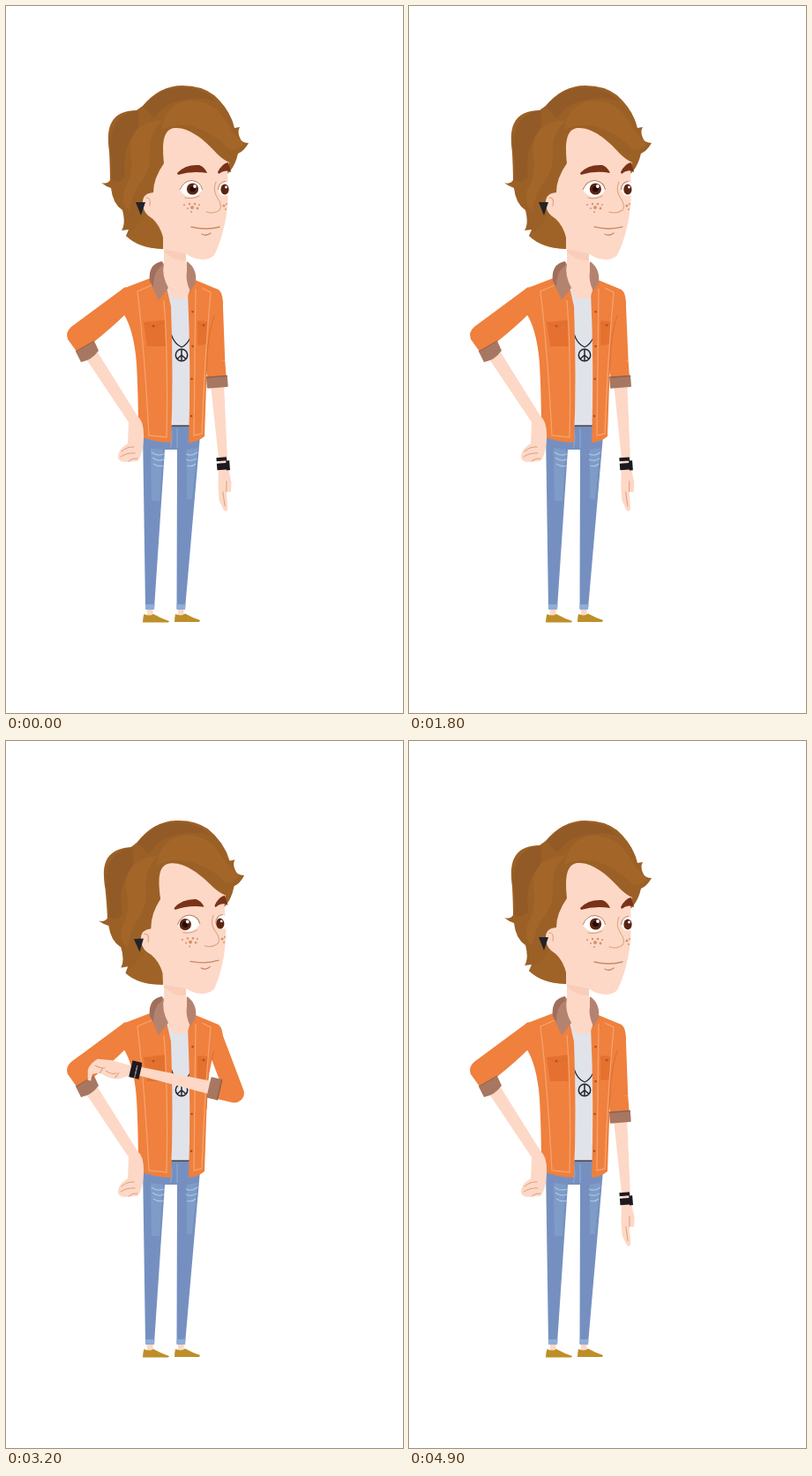
An HTML page for the animation above (5 s loop, 450x800 px).

```html
<!DOCTYPE html>
<html lang="en">
<head>
<meta charset="utf-8">
<style>
html, body { margin: 0; width: 100%; height: 100%; overflow: hidden; background: #fff; }
svg { display: block; width: 100%; height: 100%; }
.skin { fill: #fdd8c6; }
.orange { fill: #ef803d; }
.cuff { fill: #a87761; }
.jeans { fill: #7590c0; }
.stitch { fill: none; stroke: #f6a26a; stroke-width: 1.3; }
.crease { fill: none; stroke: #d99f7f; stroke-width: 1; stroke-linecap: round; }
.seam { fill: none; stroke: #d9692b; stroke-width: .8; }
.iris { fill: #5a2413; }
.shoe { fill: #bd8f28; }
</style>
</head>
<body>
<svg viewBox="0 0 450 800">
  <path id="sleeve" fill="none" stroke="#ef803d" stroke-width="21.5" stroke-linejoin="round"/>
  <circle class="orange" cx="235" cy="335" r="10.500"/>

  <g id="legs">
    <path class="skin" d="M160 680h6l1 10h-7zM195 680h6l1 10h-7z"/>
    <path class="shoe" d="M156.500 688Q163 691 167 688Q176 693 185 696L184 697.500H155Q155 692 156.500 688ZM192 688Q199 691 203 687.500Q211 692 220 695L219 697H191Q191 692 192 688Z"/>
    <path class="jeans" d="M155 478L188 474H208L220 486L203 682H193.500L194 502H180L168 682H158Z"/>
    <path fill="#7f9cc8" d="M164 500L178 502L174 560H165ZM205 502L217 500L211 558H205Z"/>
    <path fill="#8eacd8" d="M158 677H168.500L168 683H158ZM193.500 677H203.500L203 683H193.500Z"/>
    <path fill="none" stroke="#a9c5e4" stroke-width="1.3" d="M165 505Q171 510 179 507M166 511Q172 516 179 513M167 518Q173 522 179 520M204 507Q211 510 217 505M204 513Q210 516 216 512M205 520Q211 522 215 518"/>
    <path fill="none" stroke="#8fabd5" d="M186 476Q190 490 186 500M194 478V500"/>
  </g>

  <g id="torso">
    <path fill="#e1e3ea" d="M183 322H212V475H188Z"/>
    <path d="M188 475H208" stroke="#3b3030" stroke-width="1.3"/>
    <g fill="none" stroke="#25252e" stroke-width="1.5">
      <path d="M187 371Q191 383 199 386Q206 383 210 373" stroke-width="1.2"/>
      <circle cx="199" cy="395" r="6.700"/>
      <path d="M199 388V402M199 395L194 399.500M199 395L204 399.500"/>
    </g>
    <path class="orange" d="M166 307L132 320L133 348Q145 366 148 405Q150 440 150 486Q168 494 187 494Q190 420 187 340L182 318Z"/>
    <path class="orange" d="M212 309L241 321Q246 325 246 338L235 353Q228 376 228 400L225 487Q216 494 207 494Q210 410 206 322Z"/>
    <path class="seam" d="M236 350Q228 376 228 400L227 417"/>
    <path fill="#e4712f" d="M156 358L180 355L181 385L160 385ZM217 356L229 357L228 383L217 384Z"/>
    <path class="seam" d="M156 358L168 364L180 357M217 358L224 363L230 358"/>
    <path class="stitch" d="M165 316L149 323Q157 390 162 486L182 488Q184 400 179 333M215 320L213 486L222 484Q225 400 232 324L222 319"/>
    <path fill="none" stroke="#b64c20" stroke-width="2.600" stroke-linecap="round" d="M211.500 346h.1M211.500 385h.1M210.500 422h.1M210 464h.1M167 362h.1M224 361h.1"/>
    <path class="skin" d="M179 260H204V290H208L210 316L205 331H190L180 316L175 292H179Z"/>
    <path fill="#f9cdb9" d="M179 272L204 280V288Q190 289 179 278Z"/>
    <path fill="#b48370" d="M177 289Q161 292 163 311L173 333L184 319Q176 304 179 292ZM205 289Q217 297 215 313L209 323Q203 310 205 300Z"/>
    <path fill="#9f6f5c" d="M177 289Q161 292 163 311L167 318Q167 300 177 294Z"/>
  </g>

  <g id="head">
    <path fill="#9b6026" d="M200 90Q222 90 236 101Q254 117 259 138L265 137Q262 142 265 149Q267 155 275 155Q270 164 263 167Q260 180 253 188L240 200L181 240L178 275Q150 274 136 260L139 253L131 254Q136 246 132 231Q121 224 119 206Q113 204 108 200Q115 202 118 197Q118 185 117 165C113 136 119 119 148 118L155 113Q174 90 200 90Z"/>
    <path fill="#925a26" d="M150 118Q118 122 118 160Q121 180 120 196Q128 202 135 193Q130 160 150 138ZM155 114Q174 92 200 92Q224 93 238 108Q218 101 198 107Q180 110 168 126Z"/>
    <path fill="#a36628" d="M150 138Q166 128 178 130Q162 142 163 168Q164 185 154 198Q144 208 140 232Q130 225 134 208Q145 190 141 168Q139 150 150 138ZM176 140Q180 112 206 107Q236 106 250 132Q258 146 270 156Q263 163 254 163Q242 149 222 140Q198 130 176 140Z"/>
    <path fill="#a36628" d="M136 260Q150 250 158 237L179 235L178 275Q150 274 136 260Z" opacity=".5"/>
    <path class="skin" d="M179 178C176 150 180 138 193 138C208 138 225 151 239 167Q246 174 253 177L251 190Q253 215 250 235Q246 262 236 282Q226 291 210 284L203 280L178 275V262Q174 245 161 237Q155 232 155 222Q155 212 167 211Q167 195 179 178Z"/>
    <path class="crease" d="M159 217Q165 216 163 226"/>
    <path fill="#222229" d="M147 222H158L153 237Z"/>
    <path fill="#fff" d="M197 208Q202 197 211 197.500Q221 199 222.500 208Q218 216 209 216Q201 215 197 208ZM240.500 208Q241 199 249 198.500L252 201V214Q243 217 240.500 208Z"/>
    <g id="pupil">
      <circle class="iris" cx="211.500" cy="207" r="6.600"/>
      <circle cx="211.500" cy="207" r="3.300" fill="#260c08"/>
      <circle cx="214" cy="204" r="1.900" fill="#fff"/>
    </g>
    <g id="farPupil">
      <ellipse class="iris" cx="248" cy="207.500" rx="4.600" ry="6"/>
      <circle cx="249.500" cy="205" r="1.400" fill="#fff"/>
    </g>
    <path fill="none" stroke="#b98163" d="M197 208Q202 197 211 197.500Q221 199 222.500 208M240.500 208Q241 199 249 198.500"/>
    <path class="crease" d="M203 217Q211 219 219 215"/>
    <path fill="#7a3318" d="M194 189Q203 179 219 180Q225 182 228 189Q211 186 195 191ZM240 188Q245 178 252 177L255 188Q248 184 241 190Z"/>
    <path class="crease" d="M238 199Q234 208 239 216Q246 226 242 231Q235 236 227 233"/>
    <path class="crease" style="stroke:#c98a68;stroke-width:1.3" d="M210 250Q227 254 242 250M222 258Q227 261 232 257"/>
    <g id="freckles" fill="#d4936c"></g>
  </g>

  <g id="hipArm">
    <path class="skin" d="M92 401L104 392L149 464Q157 470 156 490Q155 508 149 515L133 516Q126 514 127 509Q128 501 138 495L139 471Z"/>
    <path class="crease" d="M131 504Q138 498 145 499M130 510Q138 505 146 506M139 515Q144 511 149 512"/>
    <path class="orange" d="M135 318L74 363Q67 369 70 377L80 391L101 379Q122 362 134 350L148 330Z"/>
    <path class="cuff" d="M79 391L100 379L105 390Q97 401 85 403Z"/>
    <path fill="none" stroke="#8f6150" d="M79 391L100 379"/>
  </g>

  <g id="forearm">
    <path class="skin" d="M-7.500 28H7.500L4.500 124H-4.500Z"/>
    <rect class="cuff" x="-12" y="17" width="24" height="13" rx="1"/>
    <path d="M-12 17.500H12" stroke="#8f6150" stroke-width="1.500"/>
    <g id="openHand">
      <path class="skin" d="M-6 121H5L7.500 138L6 149L1 148L1 168Q-2 172 -4 168L-8 157L-8 142Z"/>
      <path class="crease" d="M-3 148L-2 164M2 136L1 148"/>
      <path fill="#1d1a1f" d="M-7.500 109H4V113H-7.500ZM-7.500 115.500H3V113H7V124H3V123H-7.500Z"/>
    </g>
    <g id="fist">
      <path class="skin" d="M-4 120L-5 144L-3 160Q4 168 12 168L23 165.500V162L15 162L12 154L14 147Q16 136 13 130L7 120Z"/>
      <path class="crease" d="M5 161Q7 154 5 150M8 148Q11 140 8 136M12 154L6 152M13 136L7 133"/>
      <path fill="#1d1a1f" d="M-8 109.500H9V114H-8ZM-6 115H9V121H-6ZM-10 110H-6V121H-10Z"/>
      <path d="M-6 114.500H9" stroke="#77727a" stroke-width=".8"/>
    </g>
  </g>
</svg>
<script>
const LOOP = 5000, MOVE = 500, RAISE_AT = 1760, LOWER_AT = 3900;
const SHOULDER = { x: 237.5, y: 332 }, UPPER_ARM = 70;
const el = id => document.getElementById(id);
const mix = (a, b, p) => a + (b - a) * p;
const soft = t => (1 - Math.cos(Math.PI * t)) / 2;
const sharp = t => t < .5 ? 4 * t ** 3 : 1 - 4 * (1 - t) ** 3;
const progress = (time, start) => Math.min(1, Math.max(0, (time - start) / MOVE));
const set = (id, name, value) => el(id).setAttribute(name, value);

const freckles = [[202, 225, 1], [206, 229, 1], [208, 224, 1.2], [211, 228, 2], [214, 224, 1.3],
  [217, 229, 1.4], [219, 225, 1], [210, 233, 1], [247, 226, 1.5], [250, 224, 1], [249, 230, 1]];
el('freckles').innerHTML = freckles.map(([x, y, r]) => `<circle cx="${x}" cy="${y}" r="${r}"/>`).join('');

function draw(time) {
  const up = progress(time, RAISE_AT), down = progress(time, LOWER_AT);
  const body = soft(up) - soft(down);
  const fore = sharp(up) - sharp(down);

  const swing = mix(0, 18, body) * Math.PI / 180;
  const bend = mix(-4.4, 103, fore), rad = bend * Math.PI / 180;
  const x = SHOULDER.x + UPPER_ARM * Math.sin(swing);
  const y = SHOULDER.y + UPPER_ARM * Math.cos(swing);
  set('sleeve', 'd', `M235 335L${x} ${y}L${x - 20 * Math.sin(rad)} ${y + 20 * Math.cos(rad)}`);
  set('forearm', 'transform', `translate(${x} ${y}) rotate(${bend})`);
  set('openHand', 'display', fore < .5 ? 'inline' : 'none');
  set('fist', 'display', fore < .5 ? 'none' : 'inline');

  set('head', 'transform', `rotate(${-2.3 * body} 195 275)`);
  set('pupil', 'transform', `translate(${-5.5 * body} ${body})`);
  set('farPupil', 'transform', `translate(${-2.5 * body} ${body})`);
}

function tick() {
  draw(performance.now() % LOOP);
  requestAnimationFrame(tick);
}
tick();
</script>
</body>
</html>
```
